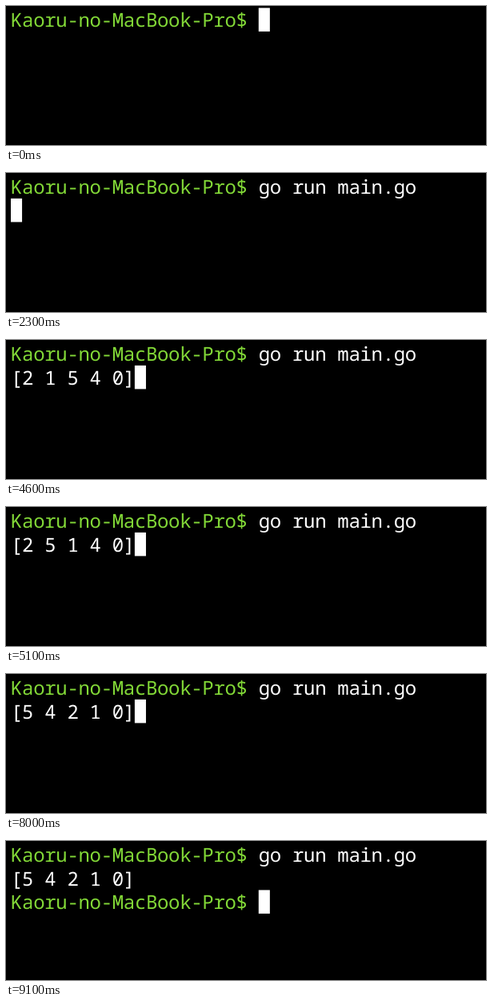
Recreate the animation shown at these times as an HTML page. Size 600x174 px, loop 9.3 s.

```html
<!DOCTYPE html>
<html lang="en">
<head>
<meta charset="utf-8">
<title>Bubble sort in a terminal</title>
<style>
  html, body { margin: 0; width: 100%; height: 100%; overflow: hidden; background: #000; }
  svg { display: block; width: 100vw; height: 100vh; }
  text {
    font: 350 24px "Noto Sans Mono", "DejaVu Sans Mono", monospace;
    letter-spacing: -0.32px;
    white-space: pre;
    text-rendering: geometricPrecision;
    fill: #fff;
  }
  .prompt { fill: #82d837; }
</style>
</head>
<body>
<svg viewBox="0 0 600 174">
  <rect width="600" height="174" fill="#000"/>
  <text id="row0"><tspan class="prompt"></tspan><tspan></tspan></text>
  <text id="row1"><tspan class="prompt"></tspan><tspan></tspan></text>
  <text id="row2"><tspan class="prompt"></tspan><tspan></tspan></text>
  <rect id="cursor" width="14.08" height="29.5" fill="#fff"/>
</svg>
<script>
const LOOP = 9300, LEFT = 6, TOP = 2.4, CELL = 14.08, LINE = 29.5;
const TYPED = 1300, ENTER = 2300, SORT = 3600, STEP = 500, DONE = 8100;
const PROMPT = 'Kaoru-no-MacBook-Pro$ ';
const COMMAND = 'go run main.go';

const cursor = document.getElementById('cursor');
const rows = [0, 1, 2].map(i => {
  const row = document.getElementById('row' + i);
  row.setAttribute('x', LEFT);
  row.setAttribute('y', 26 + i * LINE);
  return row.children;
});

// One snapshot per comparison, largest values moving to the front.
function sortSteps(list) {
  const steps = [[...list]];
  for (let i = 0; i < list.length; i++) {
    for (let j = list.length - 1; j > i; j--) {
      if (list[j] > list[j - 1]) [list[j - 1], list[j]] = [list[j], list[j - 1]];
      steps.push([...list]);
    }
  }
  return steps;
}
const steps = sortSteps([2, 1, 4, 0, 5]);

function setRow(i, prompt, text) {
  [prompt, text].forEach((s, k) => {
    if (rows[i][k].textContent !== s) rows[i][k].textContent = s;
  });
  return prompt.length + text.length;
}

function render(t) {
  const step = Math.min(Math.floor((t - SORT) / STEP), steps.length - 1);
  const lengths = [
    setRow(0, PROMPT, t >= TYPED ? COMMAND : ''),
    setRow(1, '', t >= SORT ? `[${steps[step].join(' ')}]` : ''),
    setRow(2, t >= DONE ? PROMPT : '', '')
  ];
  const line = t >= DONE ? 2 : t >= ENTER ? 1 : 0;
  cursor.setAttribute('x', LEFT + lengths[line] * CELL);
  cursor.setAttribute('y', TOP + line * LINE);
}

const start = performance.now();
function tick() {
  render((performance.now() - start) % LOOP);
  requestAnimationFrame(tick);
}
tick();
</script>
</body>
</html>
```
